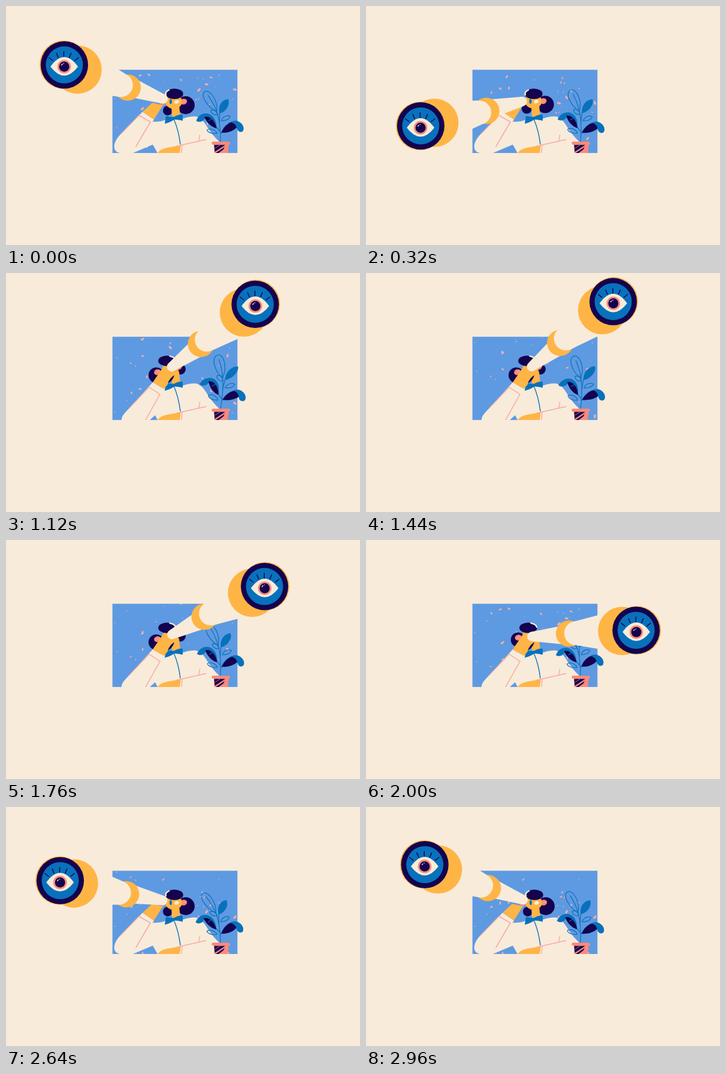
Animation, 591 px wide and 400 px high, one loop 3.04 s. Source, as an HTML page with a canvas:

```html
<!DOCTYPE html>
<html lang="en">
<head>
<meta charset="utf-8">
<title>Spyglass</title>
<style>
html, body { margin: 0; width: 100%; height: 100%; overflow: hidden; background: #f8ebda; }
canvas { display: block; width: 591px; height: 400px; }
</style>
</head>
<body>
<canvas id="stage"></canvas>
<script>
const CREAM = '#f8ebda', SKY = '#5e9ae1', YELLOW = '#ffb545', NAVY = '#14034f',
      BLUE = '#0871bc', PINK = '#f9a9a0', CORAL = '#fa8a7b', PETAL = '#f3adb0';
const LOOP = 3040, STEP = 80, TAU = Math.PI * 2;
const PANEL = { x: 178, y: 107, w: 208, h: 139 };

const canvas = document.getElementById('stage');
const ratio = window.devicePixelRatio || 1;
canvas.width = 591 * ratio;
canvas.height = 400 * ratio;
const c = canvas.getContext('2d');
c.scale(ratio, ratio);
c.lineCap = c.lineJoin = 'round';

const lerp = (a, b, k) => a + (b - a) * k;
const clamp = (v, lo, hi) => Math.min(hi, Math.max(lo, v));

// Cubic ease with flat ends; x1 and x2 are the handle positions in time
function ease(u, x1, x2) {
  let lo = 0, hi = 1, s = 0.5;
  for (let i = 0; i < 24; i++) {
    s = (lo + hi) / 2;
    const x = 3 * (1 - s) * (1 - s) * s * x1 + 3 * (1 - s) * s * s * x2 + s * s * s;
    if (x < u) lo = s; else hi = s;
  }
  return s * s * (3 - 2 * s);
}

// Direction of the spyglass in degrees: one sweep down and round, one back
function aim(t) {
  return t < 1280
    ? lerp(199.7, -39, ease(t / 1280, 0.49, 0.293))
    : lerp(-39, 200.4, ease(clamp((t - 1280) / 1650, 0, 1), 0.885, 0.37));
}

// How far the head is turned: 0 faces right, 1 faces left
function headTurn(angle) {
  const keys = [[-15, 0], [36, 0.65], [70, 0.25], [180, 1]];
  const a = clamp(angle, -15, 180);
  const i = Math.max(1, keys.findIndex(k => a <= k[0]));
  const [a0, v0] = keys[i - 1], [a1, v1] = keys[i];
  return lerp(v0, v1, (a - a0) / (a1 - a0));
}

function seeded(seed) {
  return () => (seed = seed * 16807 % 2147483647) / 2147483647;
}

function oval(x, y, rx, ry, color, turn = 0) {
  c.beginPath();
  c.ellipse(x, y, rx, ry, turn, 0, TAU);
  c.fillStyle = color;
  c.fill();
}
const disc = (x, y, r, color) => oval(x, y, r, r, color);

function poly(points, color) {
  c.beginPath();
  points.forEach(p => c.lineTo(p[0], p[1]));
  c.closePath();
  c.fillStyle = color;
  c.fill();
}

function line(points, color, width) {
  c.beginPath();
  points.forEach(p => c.lineTo(p[0], p[1]));
  c.strokeStyle = color;
  c.lineWidth = width;
  c.stroke();
}

function shape(d, color) {
  c.fillStyle = color;
  c.fill(new Path2D(d));
}

function trace(d, color, width) {
  c.strokeStyle = color;
  c.lineWidth = width;
  c.stroke(new Path2D(d));
}

function drawPetals(t) {
  const random = seeded(4217);
  const fall = Math.min(t, 2640) / 2000;
  for (let i = 0; i < 46; i++) {
    const x = PANEL.x + random() * 212;
    const y = PANEL.y + (random() + fall) % 1 * PANEL.h;
    const size = 0.6 + 2.6 * random() ** 1.6;
    oval(x, y, size + 0.3, size * 0.55, PETAL, (random() + fall) * TAU);
  }
}

function drawTorso(k) {
  const mix = (x1, y1, x2, y2) => [lerp(x1, x2, k), lerp(y1, y2, k)];
  shape(`M${mix(240, 193, 256, 200)} C256 195 262 192 268 190 L294 189 Q308 184 318 185
    Q327 187 337 204 Q345 217 357 228 L357 246 L253 246 L${mix(245, 232, 249, 238)}
    L${mix(212, 246, 240, 246)} L${mix(208, 246, 228, 246)} Z`, CREAM);
  shape('M253 246 Q258 239 270 237 L292 233 L290 246 Z', YELLOW);
  trace('M285 234.5 L334 223.5 M322 225 L323.500 216 M294 233 L293 246', PINK, 1.3);
  trace('M280 189 Q288 207 291 231', BLUE, 1.4);
}

function drawHead(angle, turn) {
  const lift = Math.sin(Math.PI * turn);
  const hairX = lerp(269, 281, turn), faceX = lerp(274, 280, turn);
  const faceY = lerp(163, 160, turn) - 3 * lift;
  const ear = (x, y) => {
    oval(x, y, 5.8, 4.8, CORAL, -0.2);
    line([[x - 2, y + 0.5], [x + 3, y - 1]], PINK, 1);
  };

  disc(lerp(291, 300, turn), lerp(161, 166, turn) - 3 * lift, lerp(9, 15, turn), NAVY);
  disc(lerp(251, 270, turn), lerp(171, 175, turn) - 10 * lift, lerp(13, 8, turn), NAVY);
  ear(lerp(288, 296.5, turn), lerp(157, 160, turn) - 2 * lift);
  ear(lerp(253, 262, turn), lerp(166, 161, turn) - 4 * lift);
  oval(faceX, faceY, 14, 12, YELLOW);
  poly([[276, 165], [289, 165], [291, 185], [277, 185]], YELLOW);
  if (angle > 53) {
    oval(faceX - 5, faceY, 2, 4, BLUE);
    oval(faceX + 5, faceY + 0.5, 4, 2.8, CREAM, -0.3);
  }
  oval(hairX, 147, 14.8, 8.8, NAVY);
  const band = (angle > 53 ? 200 : 320) / 360 * TAU;
  c.beginPath();
  c.ellipse(hairX, 147, 14.3, 8.3, 0, band - 0.55, band + 0.55);
  c.strokeStyle = CREAM;
  c.lineWidth = 2.4;
  c.stroke();
  shape('M267 184 Q273 185 280 186 Q288 181 295 182 L295 192 Q287 190 281 190 Q274 195 265 197 Z', BLUE);
}

function drawArm(k) {
  const mix = (x1, y1, x2, y2) => [lerp(x1, x2, k), lerp(y1, y2, k)];
  const outer = mix(228, 177, 245, 183), inner = mix(247, 190, 264, 194);
  const side = mix(191, 215, 206, 226);
  const cuff = [mix(222, 183, 239, 191), mix(241, 194, 257, 203)];
  shape(`M${outer} L${side} C${mix(177, 229, 194, 238)} ${mix(177, 246, 193, 242)}
    ${mix(193, 246, 193, 246)} L${mix(212, 246, 233, 246)} L${mix(217, 235, 240, 236)} L${inner} Z`, CREAM);
  poly([outer, mix(244, 162, 262, 158), mix(262, 166, 284, 168), inner], YELLOW);
  line(cuff, PINK, 1.5);
  line([cuff[1], mix(217, 235, 233, 246)], PINK, 1.5);
  line([cuff[0], side], PINK, 1.1);
}

function drawPlant(t) {
  const sway = 0.5 + 0.5 * Math.cos(TAU * (t - 970) / 2800);
  // Leans every point of a path, more towards the top
  const bend = d => d.replace(/(-?[\d.]+),(-?[\d.]+)/g, (_, x, y) => {
    const q = sway * clamp((227 - y) / 83, 0, 2) ** 1.5;
    const dip = sway * (x - 355) * 0.2 * clamp((227 - y) / 25, 0, 1);
    return (+x + 28 * q).toFixed(2) + ' ' + (+y + dip - 2 * q).toFixed(2);
  });
  const leaf = (d, color) => shape(bend(d), color);
  const stem = (d, color = BLUE) => trace(bend(d), color, 1.2);

  stem('M358,228 C358,205 353,185 348,175 C343,165 338,158 332,151');
  stem('M349,177 C335,172 318,152 326,145 C333,140 350,158 349,177');
  stem('M351,182 C346,184 340,181 339,176 C344,173 349,177 351,182');
  stem('M358,192 C360,184 367,182 372,184 C371,190 363,192 358,192');
  stem('M352,213 C344,215 336,212 335,208 C341,204 349,208 352,213');
  stem('M355,195 L354,178 M358,213 L366,206 M357,210 L349,202');
  leaf('M354,180 C349,166 358,156 366,156 C371,165 364,177 354,180', BLUE);
  leaf('M316,194 C319,183 329,179 337,182 C345,185 350,193 351,205 C341,202 335,195 330,189 C328,195 321,197 316,194', BLUE);
  leaf('M329,187 C337,184 347,191 351,205 C341,203 334,196 329,187', NAVY);
  stem('M337,193 L343,188', BLUE);
  leaf('M359,212 C361,201 373,190 383,191 C393,193 398,202 395,208 C391,212 386,209 384,202 C378,210 368,212 359,212', BLUE);
  leaf('M359,212 C363,201 370,195 375,194 C381,196 383,199 384,202 C377,210 368,212 359,212', NAVY);

  shape('M347 231 H372 L370.500 246 H348 Z', CORAL);
  shape('M347.500 232.500 H366 L348.500 244 Z M350 246 L365 236 L363 240 L355 246 Z', NAVY);
  trace('M349 238 L357 233', CORAL, 0.8);
  shape('M345 227 H372 Q374 227 374 229.500 Q374 232 372 232 H345 Q343.500 232 343.500 229.500 Q343.500 227 345 227', CORAL);
}

function drawEye(x, y, open) {
  c.save();
  c.translate(x, y);
  const lid = 32 * open, low = 30 * lerp(0.32, 1, open);
  const almond = new Path2D(`M-23 3 Q0 ${3 - lid} 23 3 Q0 ${3 + low} -23 3 Z`);
  c.fillStyle = CREAM;
  c.fill(almond);
  c.save();
  c.clip(almond);
  disc(0, 3, 11.3, CORAL);
  disc(0, 3, 8.5, NAVY);
  line([[-4.5, 0.5], [-3, -1.2]], CREAM, 1.3);
  disc(-0.8, -2.4, 0.8, CREAM);
  c.restore();
  const lash = (lx, ly) => [lx, lerp(ly * 0.4 + 2.3, ly, open)];
  for (let i = -2; i <= 2; i++) {
    line([lash(12.3 * i - 0.7, 2.5 * i * i - 22), lash(9.3 * i - 0.7, 1.7 * i * i - 14)], NAVY, 1.5);
  }
  c.restore();
}

function drawSpyglass(angle, open) {
  const a = angle / 360 * TAU, ux = Math.cos(a), uy = Math.sin(a);
  const at = (d, side = 0) => [269 + ux * d - uy * side, 160 + uy * d + ux * side];
  const ring = (d, r, color, side) => disc(...at(d, side), r, color);
  const tube = (d1, r1, d2, r2, side) =>
    poly([at(d1, side - r1), at(d2, side - r2), at(d2, side + r2), at(d1, side + r1)], CREAM);

  ring(8, 8, CREAM, 2);
  tube(8, 8, 66, 16.5, 2);
  ring(70, 22, YELLOW);
  ring(82, 20, CREAM);
  tube(80, 20, 165, 38, 0);
  ring(159, 40.5, YELLOW);
  ring(183.2, 40.5, YELLOW);
  ring(182.2, 39.6, NAVY);
  ring(182.2, 31, BLUE);
  drawEye(...at(182.5), open);
}

function draw(t) {
  const angle = aim(t), arm = clamp((110 - angle) / 74, 0, 1);
  const open = clamp(Math.abs(t - 640) / 160, 0.08, 1);

  c.fillStyle = CREAM;
  c.fillRect(0, 0, 591, 400);
  c.fillStyle = SKY;
  c.fillRect(PANEL.x - 0.3, PANEL.y - 0.3, PANEL.w + 0.7, PANEL.h + 0.3);
  c.save();
  c.beginPath();
  c.rect(PANEL.x, PANEL.y, PANEL.w + 3, PANEL.h);
  c.clip();
  drawPetals(t);
  drawTorso(arm);
  drawHead(angle, headTurn(angle));
  drawArm(arm);
  if (angle < 15) shape('M270 185 Q273 176 281 171 Q279 180 270 185', NAVY);
  c.restore();
  drawPlant(t);
  drawSpyglass(angle, open);
}

const start = performance.now();
function tick() {
  const t = (performance.now() - start) % LOOP;
  draw(Math.floor(t / STEP) * STEP);
  requestAnimationFrame(tick);
}
tick();
</script>
</body>
</html>
```
